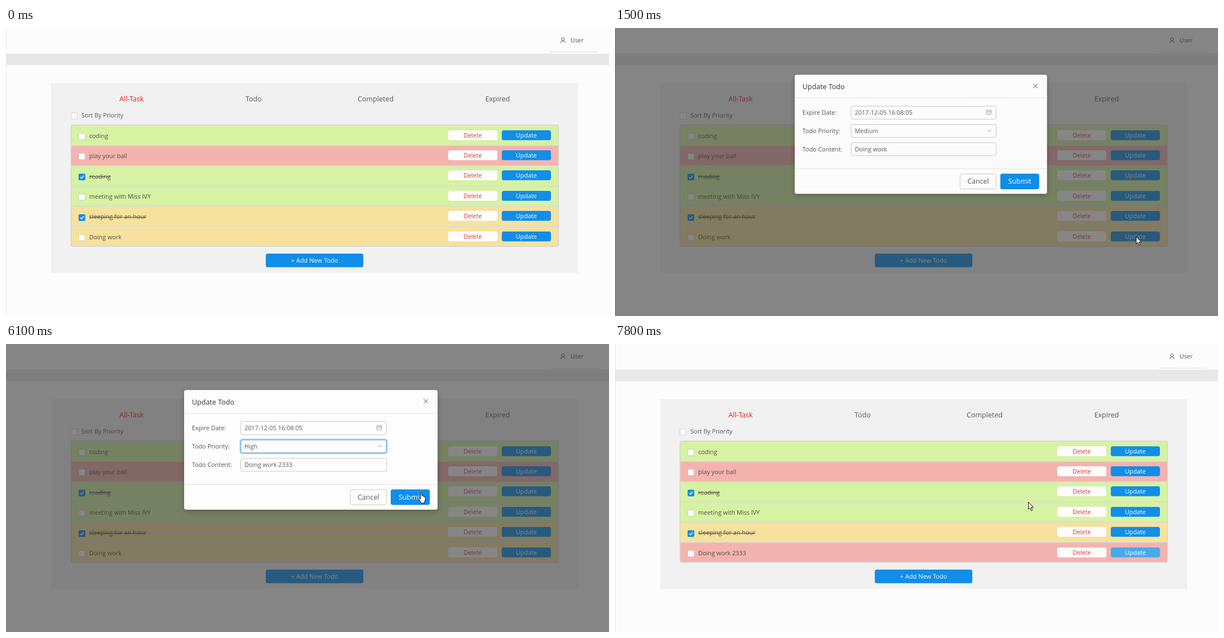
An HTML page with a canvas that plays this animation: 1080x518 px, repeating every 8000 ms.

```html
<!DOCTYPE html>
<html lang="en">
<head>
<meta charset="utf-8">
<title>Todo list</title>
<style>
html, body { margin: 0; width: 100%; height: 100%; overflow: hidden; background: #fcfcfc; }
canvas { display: block; }
</style>
</head>
<body>
<canvas id="stage" width="1080" height="518"></canvas>
<script>
const W = 1080, H = 518, LOOP = 8000, STEP = 100;
const screen2d = document.getElementById('stage').getContext('2d');
const layer = document.createElement('canvas');
layer.width = W;
layer.height = H;
const layer2d = layer.getContext('2d');
let g = screen2d;

const BLUE = '#108ee9', LIGHT = '#49a9ee', DARK = '#0e77ca', INK = '#595959';
const GREEN = '#d6f2a3', RED = '#f4b3af', YELLOW = '#f6e29c';
const ORIGIN = { x: 929.5, y: 373.5 };

const ROWS = [
  ['coding', GREEN], ['play your ball', RED], ['reading', GREEN, true],
  ['meeting with Miss IVY', GREEN], ['sleeping for an hour', YELLOW, true],
  ['Doing work', YELLOW]
];

// time, x, y, pointer shape from that time on
const PATH = [
  [100, 663, 47, 'arrow'], [500, 842, 236, 'arrow'], [800, 931, 374, 'hand'],
  [900, 933, 375, 'hand'], [1300, 933, 375, 'arrow'], [1500, 933, 375, 'arrow'],
  [2000, 530, 217, 'beam'], [3800, 530, 217, 'arrow'], [4200, 742, 275, 'hand'],
  [4300, 740, 274, 'arrow'], [4600, 600, 183, 'hand'], [4700, 600, 183, 'hand'],
  [5000, 570, 214, 'hand'], [5200, 570, 214, 'arrow'], [5500, 724, 262, 'hand'],
  [5600, 724, 262, 'hand'], [5900, 744, 267, 'hand'], [6400, 744, 267, 'arrow'],
  [6700, 744, 267, 'arrow'], [7200, 740, 284, 'arrow'], [LOOP, 740, 284, 'arrow']
];

const ramp = (t, a, b) => Math.min(1, Math.max(0, (t - a) / (b - a)));
const smooth = p => p * p * (3 - 2 * p);
const outCubic = p => 1 - (1 - p) ** 3;
const inOutCubic = p => p < .5 ? 4 * p ** 3 : 1 - 4 * (1 - p) ** 3;
const between = (t, a, b) => t >= a && t < b;

function rect(x, y, w, h, fill) {
  g.fillStyle = fill;
  g.fillRect(x, y, w, h);
}

function box(x, y, w, h, r, fill, stroke, line = 1) {
  g.beginPath();
  g.roundRect(x, y, w, h, r);
  if (fill) { g.fillStyle = fill; g.fill(); }
  if (stroke) { g.strokeStyle = stroke; g.lineWidth = line; g.stroke(); }
}

function lines(points, color, width) {
  g.beginPath();
  points.forEach(([x, y], i) => i ? g.lineTo(x, y) : g.moveTo(x, y));
  g.strokeStyle = color;
  g.lineWidth = width;
  g.stroke();
}

function text(str, x, y, size = 10.9, color = INK, align = 'left') {
  g.font = `${size}px "Open Sans", "Noto Sans", sans-serif`;
  g.textAlign = align;
  g.fillStyle = color;
  g.fillText(str, x, y + size * .36);
  return g.measureText(str).width;
}

function button(label, x, y, w, h, size, fill, color, stroke) {
  box(x, y, w, h, 3.5, fill, stroke);
  text(label, x + w / 2, y + h / 2, size, color, 'center');
}

function checkbox(x, y, on) {
  if (!on) return box(x + .5, y + .5, 11, 11, 1.5, '#fdfdfd', '#d0d0d0');
  box(x, y, 12, 12, 2, BLUE);
  lines([[x + 3, y + 6], [x + 5.2, y + 8.4], [x + 9.2, y + 3.5]], '#fff', 1.5);
}

function drawRow(i, t) {
  let [label, color, done] = ROWS[i];
  const y = 174.5 + i * 36.4, last = i === ROWS.length - 1;
  if (last && t >= 6500) { label += ' 2333'; color = RED; }
  rect(117, y, 872, 36.4, color);
  if (i) rect(117, y - .2, 872, 1.4, '#d9d9d9');
  checkbox(130, Math.round(y + 14.4), done);
  const mid = y + 19.4;
  const w = text(label, 149, mid, 10.9, '#505048');
  if (done) rect(149, Math.round(mid), w, 1, '#505048');
  let blue = BLUE;
  if (last) {
    if (between(t, 800, 1200) || t >= 7800) blue = LIGHT;
    if (between(t, 1200, 1400)) blue = DARK;
  }
  const top = Math.round(y + 9);
  button('Delete', 792, top, 88, 17.7, 10.9, '#fdfdfd', '#d9362b');
  button('Update', 888, top, 88, 17.7, 10.9, blue, '#fff');
}

function drawPage(t) {
  rect(0, 0, W, H, '#fcfcfc');
  rect(0, 46, W, 21, '#e8e8e8');
  rect(0, 0, 1, H, '#e6e6e6');
  rect(974, 43, 87, 1, '#e0e0e0');
  g.strokeStyle = INK;
  g.lineWidth = 1;
  g.beginPath();
  g.arc(997.5, 20, 2.5, 0, 7);
  g.moveTo(993.5, 27);
  g.quadraticCurveTo(994, 23, 997.5, 23);
  g.quadraticCurveTo(1001, 23, 1001.5, 27);
  g.stroke();
  text('User', 1011, 22);

  rect(81, 99, 944, 341.5, '#f1f1f1');
  ['All-Task', 'Todo', 'Completed', 'Expired'].forEach((s, i) =>
    text(s, 225 + i * 218.5, 127, 12.6, i ? INK : '#e01c14', 'center'));
  checkbox(116, 152);
  text('Sort By Priority', 135, 157.5, 10.8);

  g.save();
  g.beginPath();
  g.roundRect(116.5, 174.5, 873, 218.5, 3);
  g.clip();
  ROWS.forEach((_, i) => drawRow(i, t));
  g.restore();
  box(116.5, 174.5, 873, 218.3, 3, null, '#d4d4d4', 1.4);
  button('+ Add New Todo', 465.3, 405.7, 174.7, 24.5, 11.1, BLUE, '#fff');
}

function field(label, y, focus) {
  text(label, 333, y + 12, 10.9, '#555');
  if (focus > 0) {
    g.globalAlpha = focus * .25;
    box(419.5, y - .5, 263, 25, 4, null, BLUE, 3.5);
    g.globalAlpha = 1;
  }
  box(420.5, y + .5, 261, 23.5, 3, '#fdfdfd', '#c8c8c8');
  if (focus > 0) {
    g.globalAlpha = focus;
    box(420.5, y + .5, 261, 23.5, 3, null, '#2b9aec');
    g.globalAlpha = 1;
  }
}

function typed(t) {
  if (t < 2800) return '';
  return ' ' + '2333'.slice(0, [3300, 3500, 3600, 3700].filter(k => t >= k).length);
}

function drawMenu(open) {
  g.save();
  g.globalAlpha = open;
  g.translate(0, 200);
  g.scale(1, .8 + .2 * open);
  g.shadowColor = 'rgba(0,0,0,.2)';
  g.shadowBlur = 5;
  box(420, 0, 262, 85, 3, '#fdfdfd');
  g.shadowColor = 'transparent';
  rect(420, .5, 262, 28, '#ecf6fd');
  rect(420, 28.5, 262, 28, '#f5f5f5');
  ['High', 'Medium', 'Low'].forEach((s, i) => text(s, 427, 14.5 + i * 28));
  g.restore();
}

function drawModal(t) {
  const focusContent = outCubic(ramp(t, 2000, 2600)) * (1 - ramp(t, 4600, 4900));
  const focusSelect = ramp(t, 4600, 4900) * (1 - ramp(t, 6300, 6700));
  g.shadowColor = 'rgba(0,0,0,.25)';
  g.shadowBlur = 10;
  g.shadowOffsetY = 3;
  box(319, 82.7, 454, 215.3, 4, '#fdfdfd');
  g.shadowColor = 'transparent';

  text('Update Todo', 333, 104, 12.7, '#333');
  lines([[748.3, 99.3], [755.7, 106.7]], '#888', 1.2);
  lines([[755.7, 99.3], [748.3, 106.7]], '#888', 1.2);
  rect(319, 124, 454, 1, '#e2e2e2');
  rect(319, 252, 454, 1, '#e2e2e2');

  field('Expire Date:', 139, 0);
  text('2017-12-05 16:08:05', 427, 151, 11);
  box(664, 147, 8.5, 7.5, 1, null, '#999', .9);
  lines([[664, 149.5], [672.5, 149.5]], '#999', .9);
  lines([[666, 145.7], [666, 148]], '#999', .9);
  lines([[670.5, 145.7], [670.5, 148]], '#999', .9);
  lines([[666, 152], [670.5, 152]], '#aaa', .8);

  field('Todo Priority:', 172, focusSelect);
  text(t < 5200 ? 'Medium' : 'High', 427, 184);
  lines([[666.3, 182.3], [669.5, 185.5], [672.7, 182.3]], '#999', 1);

  field('Todo Content:', 205, focusContent);
  if (t >= 6500) {
    text('What you want to do...', 427, 217, 10.9, '#b8b8b8');
  } else {
    const w = text('Doing work' + typed(t), 427, 217);
    const blinkOff = between(t, 2900, 3300);
    if (between(t, 2100, 4600) && !blinkOff) rect(427 + w, 210.5, 1, 13, '#333');
  }

  const loading = t >= 6400, grow = loading ? 9.5 : 0;
  button('Cancel', 616.5 - grow, 262, 65, 27, 12.5, '#fdfdfd', INK, '#c8c8c8');
  const wave = ramp(t, 6300, 6700);
  if (wave > 0 && wave < 1) {
    g.globalAlpha = .4 * (1 - wave);
    box(689 - grow, 261.5, 70 + grow, 28, 3.5, null, BLUE, 6 * wave);
    g.globalAlpha = 1;
  }
  box(689 - grow, 261.5, 70 + grow, 28, 3.5, between(t, 6300, 6400) ? DARK : loading ? LIGHT : BLUE);
  text('Submit', 724, 275.5, 12.6, '#fff', 'center');
  if (between(t, 6400, 7500)) {
    const a = t / 1000 * Math.PI * 2;
    g.beginPath();
    g.arc(694, 275.5, 4.5, a, a + 4.7);
    g.strokeStyle = '#fff';
    g.lineWidth = 1.1;
    g.stroke();
  }
  const open = outCubic(ramp(t, 4600, 4900)) * (1 - ramp(t, 5200, 5500));
  if (open > 0) drawMenu(open);
}

function shape(points) {
  g.beginPath();
  points.forEach(([x, y], i) => i ? g.lineTo(x, y) : g.moveTo(x, y));
  g.closePath();
  g.fillStyle = '#fff';
  g.strokeStyle = '#111';
  g.lineWidth = 1;
  g.lineJoin = 'round';
  g.fill();
  g.stroke();
}

const POINTERS = {
  arrow: () => shape([[.5, .5], [.5, 13.3], [3.4, 10.6], [5.5, 15.8], [7.6, 14.9], [5.5, 9.9], [9.6, 9.9]]),
  hand: () => shape([[-1.6, 1.2], [-.6, .2], [.6, .8], [1, 6], [3, 6], [3.3, 7], [5, 7], [5.4, 8],
    [7, 8.4], [7.2, 13], [5.6, 16.4], [5.4, 19], [-1, 19], [-1.6, 16.6], [-4.8, 12], [-4.6, 10.4],
    [-3, 10.6], [-1.6, 12]]),
  beam: () => {
    g.fillStyle = '#d4d4d4';
    g.fillRect(0, 1, 1, 12);
    g.fillRect(-2, 0, 5, 1);
    g.fillRect(-2, 13, 5, 1);
  }
};

function drawPointer(t) {
  if (t < PATH[0][0]) return;
  const i = PATH.findIndex(k => k[0] > t) - 1;
  const [t0, x0, y0, kind] = PATH[i], [t1, x1, y1] = PATH[i + 1];
  const p = smooth(ramp(t, t0, t1));
  g.save();
  g.translate(x0 + (x1 - x0) * p, y0 + (y1 - y0) * p);
  POINTERS[kind]();
  g.restore();
}

function drawDialog(t) {
  const closing = ramp(t, 7498, 7798);
  const mask = closing ? 1 - closing : ramp(t, 1265, 1500);
  const show = closing
    ? 1 - inOutCubic(closing)
    : 1 - Math.exp(-Math.max(0, t - 1252) / 48.5);
  if (mask > 0) rect(0, 0, W, H, `rgba(55,55,55,${.6 * mask})`);
  if (show <= 0) return;
  const s = .2 + .8 * show;
  g = layer2d;
  g.setTransform(1, 0, 0, 1, 0, 0);
  g.clearRect(0, 0, W, H);
  g.setTransform(s, 0, 0, s, ORIGIN.x * (1 - s), ORIGIN.y * (1 - s));
  drawModal(t);
  g = screen2d;
  g.globalAlpha = show;
  g.drawImage(layer, 0, 0);
  g.globalAlpha = 1;
}

const start = performance.now();
function frame() {
  const elapsed = Math.max(0, performance.now() - start) % LOOP;
  const t = Math.floor(elapsed / STEP) * STEP;
  drawPage(t);
  drawDialog(t);
  drawPointer(t);
  requestAnimationFrame(frame);
}
frame();
</script>
</body>
</html>
```
